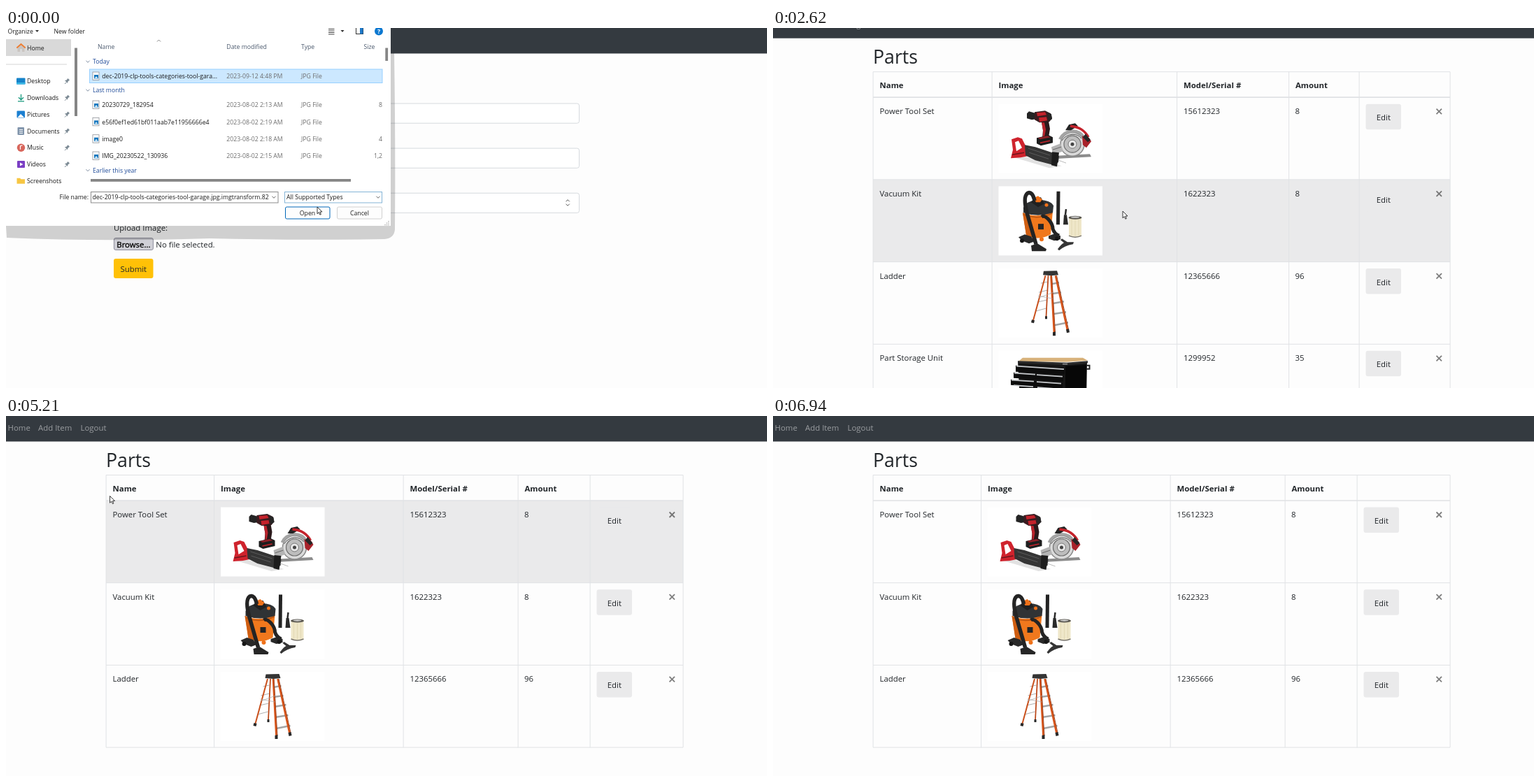
An HTML page that plays this animation: 1088 by 515 pixels, repeating every 8650 ms.

```html
<!DOCTYPE html>
<html lang="en">
<head>
<meta charset="utf-8">
<title>Parts inventory</title>
<style>
html, body { margin: 0; width: 100%; height: 100%; overflow: hidden; background: #fdfdfd; }
svg { display: block; width: 1088px; height: 515px; }
text { font: 11.4px "Open Sans", "Noto Sans", sans-serif; fill: #212529; white-space: pre; }
.b { font-weight: 700; }
.mid { text-anchor: middle; }
.end { text-anchor: end; }
.val { fill: #495057; }
.hint { fill: #6c757d; }
.link { fill: #fff; fill-opacity: .5; }
.browse { fill: #000; stroke: #000; stroke-width: .3; }
#dialog text { font-size: 8.7px; fill: #1b1b1b; }
#dialog .dim { fill: #6d6d6d; }
#dialog .head { fill: #4c5a6e; }
#dialog .group { fill: #1f4b99; }
</style>
</head>
<body>
<svg id="stage" viewBox="0 0 1088 515"></svg>
<script>
const LOOP = 8650, ROW = 117.7, SCROLL = 65.5, SHADE = '#eaeaeb';
const FILE = 'dec-2019-clp-tools-categories-tool-garage.jpg.imgtransform.82.1280.jpg';
const stage = document.getElementById('stage');

const text = (x, y, s, cls = '', extra = '') => `<text x="${x}" y="${y}" class="${cls}" ${extra}>${s}</text>`;
const rect = (x, y, w, h, fill, extra = '') => `<rect x="${x}" y="${y}" width="${w}" height="${h}" fill="${fill}" ${extra}/>`;
const fill = (d, c) => `<path d="${d}" fill="${c}" fill-rule="evenodd"/>`;
const line = (d, c, w = 1, extra = '') => `<path d="${d}" fill="none" stroke="${c}" stroke-width="${w}" ${extra}/>`;
const disc = (x, y, r, c, extra = '') => `<circle cx="${x}" cy="${y}" r="${r}" fill="${c}" ${extra}/>`;
const chevron = (x, y, c = '#555') => line(`M${x - 2.5} ${y - 1.3}l2.5 2.6 2.5-2.6`, c, .9);

// Product pictures, each drawn for an image box at x 322.5 and its own y
const pictures = [
  [130.5,
    fill('M345 207l50 15 18-3-60-15z', '#e2e2e2') +
    fill('M363 144l3-3 7 2 3 1v8l-6 1-7-2z', '#242424') +
    fill('M374 142l15-2 8 4 2 7-4 5-14 1-7-4z', '#3a1c20') + fill('M377 143l12-1 2 4-13 2zM380 150l11-1 1 5-11 2z', '#c4222b') +
    fill('M392 142l6 3 1 7-5 3z', '#262626') +
    fill('M384 156l10-1 2 11-2 12-9 1 1-11z', '#2b1a1c') + fill('M384 157l4 0 2 10-2 11-2 0 0-10z', '#b9232c') +
    fill('M377 179l17-4 6 3v8l-17 4-6-3z', '#1e1e1e') + fill('M379 179l13-3 5 2-15 3z', '#8f2028') +
    line('M382 186l14-3', '#c4222b', 1.5) +
    fill('M396 205l57-3 2 4-54 3z', '#8c8c8c') +
    disc(428, 188, 17, '#dadada', 'stroke="#8a8a8a" stroke-width="1.500"') +
    disc(428, 188, 12, '#bdbdbd', 'stroke="#6d6d6d" stroke-width="1.200"') +
    disc(428, 188, 6, '#e8e8e8', 'stroke="#777"') + disc(428, 188, 2.5, '#444') +
    line('M410 181q5-11 18-12 12 0 17 10', '#a4a4a4', 4) + line('M413 183q5-8 15-9 9 0 13 6', '#555', 1) +
    fill('M398 192l13-5 4 11-15 5z', '#b4b4b4') + line('M400 196l12-4', '#666') +
    fill('M418 168l5-8 9-2 4 4-10 6z', '#242424') + line('M425 162q10 1 16 5t10 11', '#c4222b', 3.5) +
    fill('M442 176l10 3 3 5-7 9-5-4z', '#a8222a') + fill('M447 173l7 9-4 3-7-7z', '#262626') +
    fill('M341 181l9-3 6 2 5 10 3 15-10 2-14 1 3-12zM346 185l5-2 5 10-8 5z', '#cf232d') +
    line('M342 203l17-3', '#6b171d', 1.5) +
    fill('M360 189l15 3 24 8 10 5-1 9-10 3-23-6-14-7z', '#353535') +
    line('M365 194l31 10M366 200l28 9', '#5b5b5b') +
    fill('M399 199l10 1-3 20-8-2z', '#1c1c1c') + line('M408 211l11 4', '#bbb')],
  [248.2,
    line('M408 255.500L407.500 303', '#232323', 5) + line('M419 281l-1 8', '#2a2a2a', 2.500) +
    fill('M416 289l4 0 2 14-7 0z', '#2a2a2a') +
    fill('M357 286q22 9 43-2l-3 33q-18 10-35 1z', '#f0781d') + fill('M357 286l5 32 8 3-4-32z', '#cf5e12') +
    line('M358 289q21 8 41-2', '#b95310', 1.5) +
    fill('M358 279q3-9 18-11 20-1 25 8l-1 10q-21 7-42 0z', '#303335') +
    fill('M369 271l5-7 9 0 5 9-9 5z', '#202020') + fill('M373 265l6-3 6 5-3 4-6 0z', '#ef7119') + disc(391, 275, 2.5, '#ef7119') +
    fill('M351 321l9-4 9 3 5 7-8 3-10-4z', '#292929') + fill('M394 319l9-3 8 3 0 5-9 2-8-3z', '#292929') +
    disc(356, 326, 3, '#161616') + disc(384, 324, 3, '#ef7119') + disc(406, 323, 3, '#161616') +
    rect(379, 302, 8, 8, '#252525') +
    line('M374 269Q371 255 364 258Q357 263 363 286L376 331', '#242424', 5.500) +
    fill('M369 333l9-3 13 8-1 3-20 0z', '#262626') +
    line('M384 292Q388 289 395 297Q400 303 400 309Q402 316 409 319', '#242424', 5) +
    rect(423, 293, 18, 27, '#efe7c9', 'rx="2"') + line('M427 296v22M432 297v23M437 296v22', '#e2d8b4', 1) +
    `<ellipse cx="432" cy="293" rx="9.500" ry="2.500" fill="#5a5750"/><ellipse cx="432" cy="292.500" rx="6" ry="1.200" fill="#ccc"/>` +
    line('M423 319q9 4 18 0', '#77736a', 1.5) +
    fill('M407 338q6-8 9-9l-5-4 2-2 8 5 9 0-1 3q-12 2-20 9z', '#353535')],
  [365.9,
    line('M378 414l13-3M375 427l15-4M380 400l12-3M383 387l9-2', '#b0b0b0') +
    line('M389.500 376L372 440', '#c9501c', 2) + line('M393.500 376L390.500 435', '#b94314', 1.700) +
    line('M398 388l11-2M398 402l14-2M399 416l17-3M400 431l19-3M402 447l20-4', '#a4a4a4', 2.500) +
    line('M397.500 376L402 458M404 376L421 454', '#d8551a', 2.700) +
    line('M398.500 376L403.500 457M405.500 376L422.500 453', '#963610', .9) +
    line('M379 405l21 4M379 408l22-8', '#aaa', .7) +
    fill('M387 369.500l19-.5 2 6-10 1-12-1z', '#343434') +
    fill('M370 439l4 1-1 4-4-1zM389 434h3v4h-3zM400 457l4-1 0 6-4 0zM419 453l4-1 1 5-4 1z', '#292929')],
  [418.1,
    fill('M362 501l48 10 38-10-10-4z', '#ddd') +
    [[361, 498], [408, 505], [442, 500]].map(([x, y]) => disc(x, y, 5, '#1d1d1d') + disc(x, y, 2, '#9a9a9a')).join('') +
    fill('M350 433l70 3 29-2-1 58-33 5-62-9z', '#161616') + fill('M418 440l30-2-1 54-29 4z', '#070707') +
    fill('M351 433l6-5 86 0 7 4-30 2z', '#d8b27b') + fill('M350 432.500l70 2.500 30-2.500v3l-30 3-70-3z', '#2b2b2b') +
    fill('M347 439l70 4v9l-70-4zM344 449l71 4v9l-71-5zM340 459l74 5v8l-74-5z', '#0d0d0d') +
    line('M348 440l68 4.500M345 450l30 2M377 452.500l37 2.500M341 460l32 2M377 462.500l35 2.500M344 467.500l28 2M378 470.500l34 2.500', '#c8cbce', 1.700) +
    fill('M336 473l36 3 56 9v12l-22 4-69-12z', '#0b0b0b') +
    line('M338 475.500l33 3M374 479.500l53 9', '#c8cbce', 1.800) +
    rect(414, 436.5, 7, 1.2, '#aaa') + line('M448 439h4.500v5h-4.500', '#222', 2)],
];

const items = [['Power Tool Set', '15612323', 8], ['Vacuum Kit', '1622323', 8],
  ['Ladder', '12365666', 96], ['Part Storage Unit', '1299952', 35]];

function table(cols, count) {
  const bottom = 121 + ROW * count, gray = '#e0e2e5';
  let rows = '', rules = '';
  for (let i = 0; i < count; i++) {
    const y = 121 + ROW * i, [name, model, amount] = items[i], [refY, art] = pictures[i];
    const imgX = cols[1] + 9.5, btn = cols[4] + 9.5, mid = btn + 25.3;
    rows += rect(143, y, 825, ROW, SHADE, 'class="row"') + text(152.5, y + 24, name) +
      rect(imgX, y + 9.5, 148.5, 99, '#fff') +
      `<g transform="translate(${imgX - 322.5} ${y + 9.5 - refY})">${art}</g>` +
      text(cols[2] + 9.5, y + 24, model) + text(cols[3] + 9, y + 24, amount) +
      rect(btn, y + 9.5, 50.5, 36.5, SHADE, 'rx="3"') + text(mid, y + 33, 'Edit', 'mid') +
      line(`M948.500 ${y + 16.500}l7.500 7.500m0-7.500l-7.500 7.500`, '#000', 1.800, 'class="close"');
    rules += `M143 ${y + ROW}H968`;
  }
  const heads = ['Name', 'Image', 'Model/Serial #', 'Amount'].map((h, i) => text(cols[i] + 9.5, 107.5, h, 'b')).join('');
  return text(143, 72.5, 'Parts', '', 'style="font-size:26.700px"') + rows + heads +
    line(rules + 'M143 84.500H968' + cols.map(x => `M${x + .1} 84.500V${bottom}`).join(''), gray) +
    line('M143 121H968', gray, 1.700);
}

function form(values, cls, file) {
  const labels = ['Name:', 'Model/Serial Number:', 'Amount:'];
  const fields = labels.map((label, i) => {
    const y = 108 + 64.1 * i;
    return text(154, y - 10, label) +
      rect(154.2, y, 665.3, 28.2, '#fff', 'rx="3" stroke="#d6dade"') + text(163.5, y + 18.8, values[i], cls);
  }).join('');
  return text(143, 72.5, 'Add Item', '', 'style="font-size:28.400px"') + fields +
    line('M800.500 248.300l2.600-2.600 2.600 2.600M800.500 251.700l2.600 2.600 2.600-2.600', '#555', 1) +
    text(154, 290, 'Upload Image:') +
    rect(154.4, 300.5, 56, 17, '#fcfcfc', 'rx="2.500" stroke="#8f8f9d" class="pick"') +
    text(182.4, 313.5, 'Browse...', 'browse mid') + text(214.3, 313.5, file, 'file') +
    rect(154, 330, 56.5, 28, '#ffc107', 'rx="3" class="submit"') + text(182.3, 349, 'Submit', 'mid');
}

function dialog() {
  const places = [['Desktop', '#1683c9'], ['Downloads', ''], ['Pictures', '#1b7fd1'], ['Documents', '#8094ab'],
    ['Music', '#d8665c'], ['Videos', '#7b3fc4'], ['Screenshots', '#f7c643']];
  const side = places.map(([name, c], i) => {
    const y = 76 + 23.8 * i;
    const icon = [
      rect(15, y - 4.5, 12.5, 9, c, 'rx="1"') + rect(15, y + 2, 12.5, 2.5, '#39b7e5'),
      line(`M21.500 ${y - 5}v8m-3.500-3.500l3.500 3.500 3.500-3.500M17 ${y + 5}h9`, '#18997e', 1.3),
      rect(15.5, y - 5, 11.5, 10, c, 'rx="1"') + fill(`M16.500 ${y + 4.5}l4.500-5 5 5z`, '#fff'),
      rect(16.5, y - 5.5, 9.5, 11, c, 'rx="1"') + line(`M19 ${y - 2}h5m-5 2.500h5m-5 2.500h5`, '#fff'),
      disc(21.5, y, 5.7, c) + line(`M20.500 ${y + 2.5}v-5l3-1`, '#fff', 1.2),
      rect(16, y - 5, 11, 10, c, 'rx="1"') + fill(`M20 ${y - 2.5}l4.500 2.500-4.500 2.500z`, '#fff'),
      fill(`M15.500 ${y - 4}h4.500l1.500 1.500h5.500v6.500h-11.500z`, c),
    ][i];
    const pin = i < 6 ? line(`M84 ${y + 4}l2.500-2.500`, '#7c8a94') + fill(`M84 ${y - 1}l2.500-.5 2-2.500 2.500 2.500-2.500 2-.5 2.500z`, '#7c8a94') : '';
    return icon + text(30, y + 3.2, name) + pin;
  }).join('');

  const files = [['dec-2019-clp-tools-categories-tool-gara...', '2023-09-12 4:48 PM', '', 69],
    ['20230729_182954', '2023-08-02 2:13 AM', '8', 110],
    ['e56f0ef1ed61bf011aab7e11956666e4', '2023-08-02 2:19 AM', '', 134.3],
    ['image0', '2023-08-02 2:18 AM', '4', 158.7], ['IMG_20230522_130936', '2023-08-02 2:15 AM', '1,2', 183]]
    .map(([name, date, size, y]) =>
      rect(124, y - 6, 9, 11.5, '#fff', 'stroke="#8d9197" stroke-width=".8"') + rect(126, y - 2, 6, 5.5, '#1676bd') +
      fill(`M126.500 ${y + 3}l2.500-3 2.500 3z`, '#cfe9f7') +
      text(137.3, y + 3.2, name) + text(315.3, y + 3.2, date, 'dim') + text(422, y + 3.2, 'JPG File', 'dim') +
      text(538, y + 3.2, size, 'dim end')).join('');
  const groups = [['Today', 48], ['Last month', 89], ['Earlier this year', 203.5]]
    .map(([name, y]) => chevron(117, y, '#6f7f96') + text(124, y + 3.2, name, 'group')).join('');
  const heads = [['Name', 131], ['Date modified', 315.3], ['Type', 422], ['Size', 511.5]]
    .map(([name, x]) => text(x, 29.5, name, 'head')).join('');

  return fill('M0 283H550V36h5q2 130 1 252-1 13-15 14-130 2-250-1-150 5-290-1z', 'rgba(0,0,0,.18)') +
    rect(0, 0, 550, 283, '#fff') +
    text(2.5, 7.5, 'Organize') + fill('M42 3h5l-2.500 3z', '#333') + text(68.5, 7.5, 'New folder') +
    line('M461 1.500h8.500m-8.500 2.500h8.500m-8.500 2.500h8.500m-8.500 2.500h8.500', '#444', 1) + fill('M478.500 3h5l-2.500 3z', '#333') +
    rect(500.5, -2, 10, 10.5, '#fff', 'stroke="#333"') + rect(506, -2, 4.5, 10.5, '#1d78c8') +
    disc(533, 4.5, 6, '#0b78d0') + text(533, 8, '?', 'mid b', 'style="fill:#fff"') +
    rect(0, 16, 93, 24, '#d9d9d9') + fill('M16.500 28l5-4.500 5 4.500v6h-3.500v-4h-3v4h-3.500z', '#c9c4c0') +
    line('M15.300 28.500l6.200-5.500 6.200 5.500', '#ee7d31', 1.8) + text(30, 31.5, 'Home') +
    line('M0 52h87', '#d5d5d5') + side + rect(98, 28.5, 4, 97.5, '#858585') +
    line('M216 19.500l2.500-2.500 2.500 2.500', '#777', .9) + heads + groups +
    rect(119.5, 59, 418.5, 19.5, '#cce8ff', 'stroke="#99d1ff"') + files +
    rect(542.3, 28.5, 3.8, 18.5, '#858585') + rect(121, 216, 372, 3.8, '#858585') +
    text(118, 245.3, 'File name:', 'end') + rect(121.5, 234.5, 267.5, 15.5, '#fff', 'stroke="#8c8c8c"') +
    text(123.5, 245.3, FILE.slice(0, FILE.indexOf('.1280'))) + chevron(383, 242) +
    rect(398.5, 234.5, 139, 15.5, '#fff', 'stroke="#84b4d6"') + text(401, 245.3, 'All Supported Types') + chevron(532, 242) +
    rect(399.5, 256, 63.5, 17, '#fdfdfd', 'rx="2" stroke="#0067b8"') + text(431, 268, 'Open', 'mid') +
    rect(473.5, 256, 64, 17, '#fdfdfd', 'rx="2" stroke="#d0d0d0"') + text(505.5, 268, 'Cancel', 'mid') +
    line('M547 276v7M544.500 278.500v4.500M542 281v2', '#a0a0a0', 1.3, 'stroke-dasharray="1.300 1.200"');
}

stage.innerHTML = rect(0, 0, 1088, 515, '#fdfdfd') +
  `<g id="page">${rect(0, 0, 1088, 36.5, '#343a40')}
  ${['Home', 'Add Item', 'Logout'].map((s, i) => text([2.5, 46, 106.5][i], 20.8, s, 'link')).join('')}
  <g class="view">${form(['Part Storage Unit', '1299952', '35'], 'val', FILE)}</g>
  <g class="view">${table([143, 313, 577.5, 737.5, 838, 968], 4)}</g>
  <g class="view">${table([143, 297.5, 568, 732, 835, 968], 3)}</g>
  <g class="view">${form(['Enter name', 'Enter model/serial number', 'Enter amount'], 'hint', 'No file selected.')}</g></g>
  <g id="dialog">${dialog()}</g>
  <g id="cursor" stroke="#222" stroke-width=".9" fill="#fff" stroke-linejoin="round">
  <path id="arrow" d="M0 0V9.800L2.300 7.700 3.900 11.200 5.400 10.500 3.900 7H7Z"/>
  <path id="hand" d="M-1 8V1a1 1 0 0 1 2 0V5q1-.6 1.700.3 1-.4 1.600.5 1.200-.2 1.400 1V10q0 2.500-1.500 4H0L-3.500 9.500q-.3-1.500 1-1.200z"/></g>`;

const $ = s => stage.querySelector(s), all = (s, el = stage) => [...el.querySelectorAll(s)];
const views = all('.view'), links = all('.link');
const [pick, submit, file] = ['.pick', '.submit', '.file'].map(s => views[0].querySelector(s));
const parts = views.map(v => ({ rows: all('.row', v), closes: all('.close', v) }));

// Pointer way points: time, x, y
const track = [[0, 445, 256], [60, 445, 256], [250, 405, 300], [450, 300, 365], [620, 228, 383], [760, 195, 368], [850, 190.5, 354.5],
  [1280, 190.5, 354.5], [1400, 165, 300], [1580, 80, 120], [1720, 35, 42], [1820, 24.5, 23.5],
  [2180, 24.5, 23.5], [2270, 220, 130], [2380, 500, 262], [2980, 500, 262], [3050, 680, 345], [3120, 838, 422.5], [3180, 838, 422.5],
  [3320, 905, 430], [3540, 951, 426], [4650, 951, 426], [4760, 890, 330], [4930, 600, 240], [5090, 280, 165], [5210, 149, 115],
  [5320, 98, 50], [5430, 72, 19], [5620, 72, 19], [5850, 50, 20], [6040, 28.5, 18],
  [6300, 28.5, 18], [6450, 230, 75], [6600, 640, 190], [6740, 975, 310], [6880, 1058, 435], [6940, 1100, 480]];

function pointer(t) {
  const i = track.findIndex(k => k[0] > t);
  if (i < 0) return [1200, 600];
  const [a, b] = [track[i - 1], track[i]], u = (t - a[0]) / (b[0] - a[0]);
  return [a[1] + (b[1] - a[1]) * u, a[2] + (b[2] - a[2]) * u];
}

const inside = ([x, y], l, t, r, b) => x >= l && x < r && y >= t && y < b;
const show = (el, on) => el.setAttribute('display', on ? 'inline' : 'none');

function draw(t) {
  const view = t < 2000 ? 0 : t < 4100 ? 1 : t < 5560 ? 2 : t < 6280 ? 3 : 2;
  const scroll = t >= 2620 && t < 4100 ? SCROLL * Math.min(3, 1 + Math.floor((t - 2620) / 45)) / 3 : 0;
  const [x, y] = pointer(t);
  // Hover styling trails the pointer slightly
  const [hx, hy] = pointer(Math.max(0, t - 50));
  const p = [hx, hy + scroll], idle = t >= 4100 && t < 4750;
  let hand = false;

  views.forEach((v, i) => show(v, i === view));
  $('#page').setAttribute('transform', `translate(0 ${-scroll})`);
  links.forEach((el, i) => {
    const on = inside(p, [-3, 40, 101][i], 5, [40, 101, 150][i], 31);
    el.style.fillOpacity = on ? .85 : .5;
    hand = hand || on;
  });
  parts[view].rows.forEach((el, i) => {
    const top = 121 + ROW * i, cross = parts[view].closes[i];
    show(el, !idle && inside(p, 143, top, 968, top + ROW));
    const onCross = !idle && inside(p, 945, top + 10, 960, top + 30);
    cross.setAttribute('stroke-opacity', onCross ? (t >= 3920 ? 1 : .75) : .5);
    hand = hand || onCross;
  });
  const onSubmit = view === 0 && t >= 840 && inside([x, y], 154, 330, 211, 358);
  submit.setAttribute('fill', onSubmit ? (t >= 970 ? '#d39e00' : '#d9a306') : '#ffc107');
  hand = hand || onSubmit;

  const open = t < 120;
  show($('#dialog'), open);
  $('#dialog').setAttribute('opacity', t < 60 ? 1 : .5);
  pick.setAttribute('fill', open ? '#d0d0d7' : '#fcfcfc');
  file.textContent = open ? 'No file selected.' : FILE;

  show($('#cursor'), t < 6940);
  $('#cursor').setAttribute('transform', `translate(${x} ${y})`);
  show($('#hand'), hand);
  show($('#arrow'), !hand);
}

function tick() {
  draw(performance.now() % LOOP);
  requestAnimationFrame(tick);
}
tick();
</script>
</body>
</html>
```
